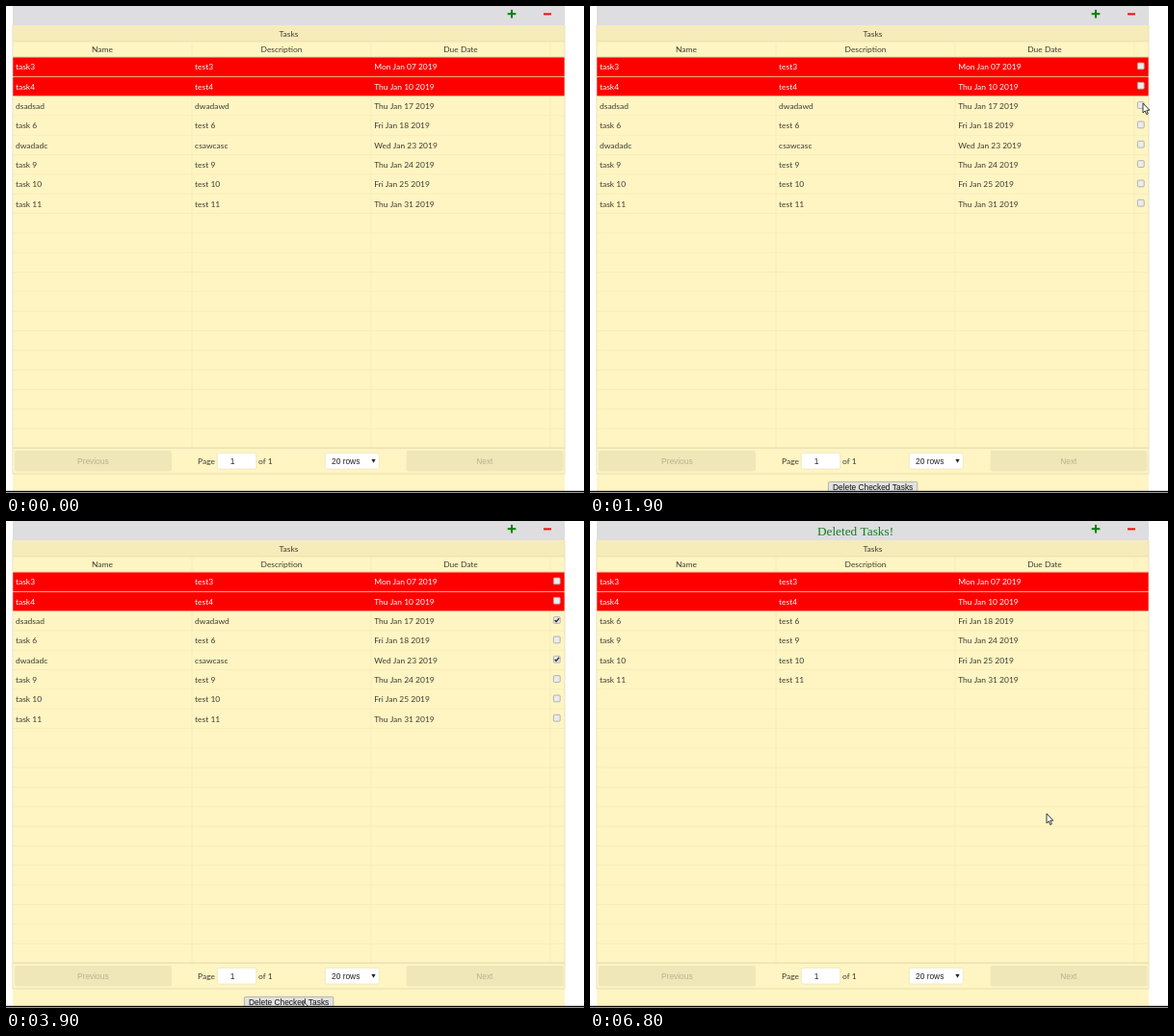
These frames come from a looping animation (600x506 px, 7.1 s). An HTML page with a canvas:

```html
<!DOCTYPE html>
<html lang="en">
<head>
<meta charset="utf-8">
<title>Task table</title>
<style>
  html, body { margin: 0; width: 100%; height: 100%; overflow: hidden; background: #fff; }
  canvas { display: block; width: 600px; height: 506px; }
</style>
</head>
<body>
<canvas id="stage"></canvas>
<script>
const LOOP = 7100, STEP = 100;
const SHOW_CHECKS = 800, CHECK_FIRST = 2000, CHECK_SECOND = 2400;
const DELETE_CLICK = 4300, ROWS_REMOVED = 4700;
const LEFT = 7, RIGHT = 580, ROW_TOP = 53, ROW_H = 20.33;
const LATO = '8.45px Lato, sans-serif';
const ARIAL = '8.4px "Liberation Sans", Arial, sans-serif';
const INK = '#3d3a30';

const tasks = [
  ['task3', 'test3', 'Mon Jan 07 2019'],
  ['task4', 'test4', 'Thu Jan 10 2019'],
  ['dsadsad', 'dwadawd', 'Thu Jan 17 2019'],
  ['task 6', 'test 6', 'Fri Jan 18 2019'],
  ['dwadadc', 'csawcasc', 'Wed Jan 23 2019'],
  ['task 9', 'test 9', 'Thu Jan 24 2019'],
  ['task 10', 'test 10', 'Fri Jan 25 2019'],
  ['task 11', 'test 11', 'Thu Jan 31 2019']
];

// Pointer stops: time, x, y
const stops = [
  [100, 540, 506], [500, 580, 100], [800, 568, 10], [1300, 568, 10],
  [1800, 574, 101], [2100, 574, 101], [2300, 574, 142], [2700, 574, 142],
  [3200, 390, 392], [3500, 310, 498], [4300, 308, 501], [4600, 308, 501],
  [5000, 474, 304], [LOOP, 474, 304]
];

const canvas = document.getElementById('stage');
const ratio = window.devicePixelRatio || 1;
canvas.width = 600 * ratio;
canvas.height = 506 * ratio;
const ctx = canvas.getContext('2d');
ctx.scale(ratio, ratio);

function rect(x, y, w, h, color) {
  ctx.fillStyle = color;
  ctx.fillRect(x, y, w, h);
}

function box(x, y, w, h, radius, fill, border) {
  ctx.beginPath();
  ctx.roundRect(x, y, w, h, radius);
  ctx.fillStyle = fill;
  ctx.fill();
  if (border) {
    ctx.strokeStyle = border;
    ctx.lineWidth = 0.8;
    ctx.stroke();
  }
}

function text(str, x, y, color = INK, align = 'left', font = LATO) {
  ctx.font = font;
  ctx.fillStyle = color;
  ctx.textAlign = align;
  ctx.fillText(str, x, y);
}

function shape(points, fill, stroke, width) {
  ctx.beginPath();
  points.forEach(([x, y]) => ctx.lineTo(x, y));
  ctx.closePath();
  ctx.fillStyle = fill;
  ctx.fill();
  ctx.strokeStyle = stroke;
  ctx.lineWidth = width;
  ctx.lineJoin = 'round';
  ctx.stroke();
}

function drawHeader(t) {
  rect(LEFT, 0, RIGHT - LEFT, 20, '#dedde0');
  if (t >= DELETE_CLICK) {
    text('Deleted Tasks!', 275.5, 14.5, '#14801b', 'center', '13.3px "Liberation Serif", Times, serif');
  }
  rect(520.7, 7.2, 8.6, 2, '#087d08');
  rect(524, 3.9, 2, 8.6, '#087d08');
  rect(558, 7.4, 8, 2, '#f00808');

  rect(LEFT, 20, RIGHT - LEFT, 17, '#f6ecba');
  rect(LEFT, 36.5, RIGHT - LEFT, 0.8, '#e6dcae');
  rect(LEFT, 52, RIGHT - LEFT, 1, '#eee4b5');
  text('Tasks', 293.5, 32, INK, 'center');
  ['Name', 'Description', 'Due Date'].forEach((name, i) =>
    text(name, 100 + 186 * i, 48.2, INK, 'center'));
}

function drawCheckbox(y, checked) {
  box(568.4, y - 3.4, 6.8, 6.8, 1, '#ececec', '#a5a39b');
  if (!checked) return;
  ctx.beginPath();
  ctx.moveTo(569.7, y);
  ctx.lineTo(571.2, y + 1.7);
  ctx.lineTo(574.1, y - 2);
  ctx.strokeStyle = '#333';
  ctx.lineWidth = 1.4;
  ctx.stroke();
}

function drawRows(t) {
  const rows = t >= ROWS_REMOVED ? tasks.filter((_, i) => i !== 2 && i !== 4) : tasks;
  for (let i = 1; i <= 20; i++) {
    rect(LEFT, ROW_TOP + ROW_H * i - 0.5, RIGHT - LEFT, 0.8, '#f5ebbb');
  }
  for (const x of [193, 379, 565]) rect(x - 0.4, 37, 0.8, 423, '#f6ecbc');

  rows.forEach((row, i) => {
    const top = ROW_TOP + ROW_H * i, urgent = i < 2;
    if (urgent) rect(LEFT, top + 0.4, RIGHT - LEFT, ROW_H - 0.7, '#f00');
    row.forEach((value, col) =>
      text(value, 10 + 186.1 * col, top + 13.3, urgent ? '#fff' : INK));
    if (t >= SHOW_CHECKS && t < DELETE_CLICK) {
      drawCheckbox(top + 9.4, i === 2 && t >= CHECK_FIRST || i === 4 && t >= CHECK_SECOND);
    }
  });
}

function drawPager() {
  rect(LEFT, 458.5, RIGHT - LEFT, 1.5, '#eae0b3');
  rect(LEFT, 485.5, RIGHT - LEFT, 1, '#e6dcb0');
  for (const [x, label] of [[9, 'Previous'], [415.5, 'Next']]) {
    box(x, 462, 163, 21.5, 2, '#f0e7b8');
    text(label, x + 81.3, 475.6, '#b9b28f', 'center', ARIAL);
  }
  text('Page', 199, 475.6);
  text('of 1', 262, 475.6);
  box(219.3, 464.3, 40.5, 16.8, 2, '#fff', '#eee5bc');
  text('1', 235.2, 475.7, '#222', 'center', ARIAL);
  box(331.3, 464.3, 56, 16.8, 2, '#fff', '#eee5bc');
  text('20 rows', 338, 475.7, '#222', 'left', ARIAL);
  shape([[379.6, 471], [383.4, 471], [381.5, 474.5]], '#222', '#222', 0.3);
}

function drawDeleteButton() {
  box(247.4, 494.4, 92.4, 14, 1, '#e2e2e0', '#a5a5a2');
  text('Delete Checked Tasks', 293.6, 503.4, '#111', 'center', ARIAL);
}

function pointerAt(t) {
  const i = stops.findIndex(stop => stop[0] > t);
  const [t0, x0, y0] = stops[i - 1], [t1, x1, y1] = stops[i];
  const p = (t - t0) / (t1 - t0), ease = p * p * (3 - 2 * p);
  return [x0 + (x1 - x0) * ease, y0 + (y1 - y0) * ease];
}

function drawPointer(t) {
  if (t < stops[0][0]) return;
  const [x, y] = pointerAt(t);
  ctx.save();
  ctx.translate(x, y);
  if (y < 14) {
    shape([[0, 0.5], [1.3, 0], [2.2, 1], [2.2, 5], [4, 4.9], [5.4, 5.7], [7, 6.4],
      [7.2, 9.5], [5.9, 12], [5.9, 13.8], [0.4, 13.8], [0, 12], [-3.8, 7.5],
      [-2.7, 6.6], [-0.4, 8.3]], '#fff', '#222', 0.9);
  } else {
    shape([[0, 0], [0, 10], [2.2, 8], [3.7, 11.6], [5.3, 10.9], [3.8, 7.4], [6.8, 7.2]],
      '#fff', '#222', 0.9);
  }
  ctx.restore();
}

function draw(t) {
  rect(0, 0, 600, 506, '#fff');
  rect(LEFT, 20, RIGHT - LEFT, 484, '#fff5c3');
  drawHeader(t);
  drawRows(t);
  drawPager();
  rect(LEFT - 0.5, 20, 0.8, 466, '#e4dcb8');
  rect(RIGHT - 0.4, 20, 0.8, 466, '#e4dcb8');
  if (t >= SHOW_CHECKS && t < DELETE_CLICK) drawDeleteButton();
  drawPointer(t);
  rect(0, 504, 600, 2, '#fff');
  rect(0, 503.8, 600, 1.6, '#050505');
}

const start = performance.now();
function tick() {
  const t = (performance.now() - start) % LOOP;
  draw(Math.floor(t / STEP) * STEP);
  requestAnimationFrame(tick);
}
tick();
</script>
</body>
</html>
```
